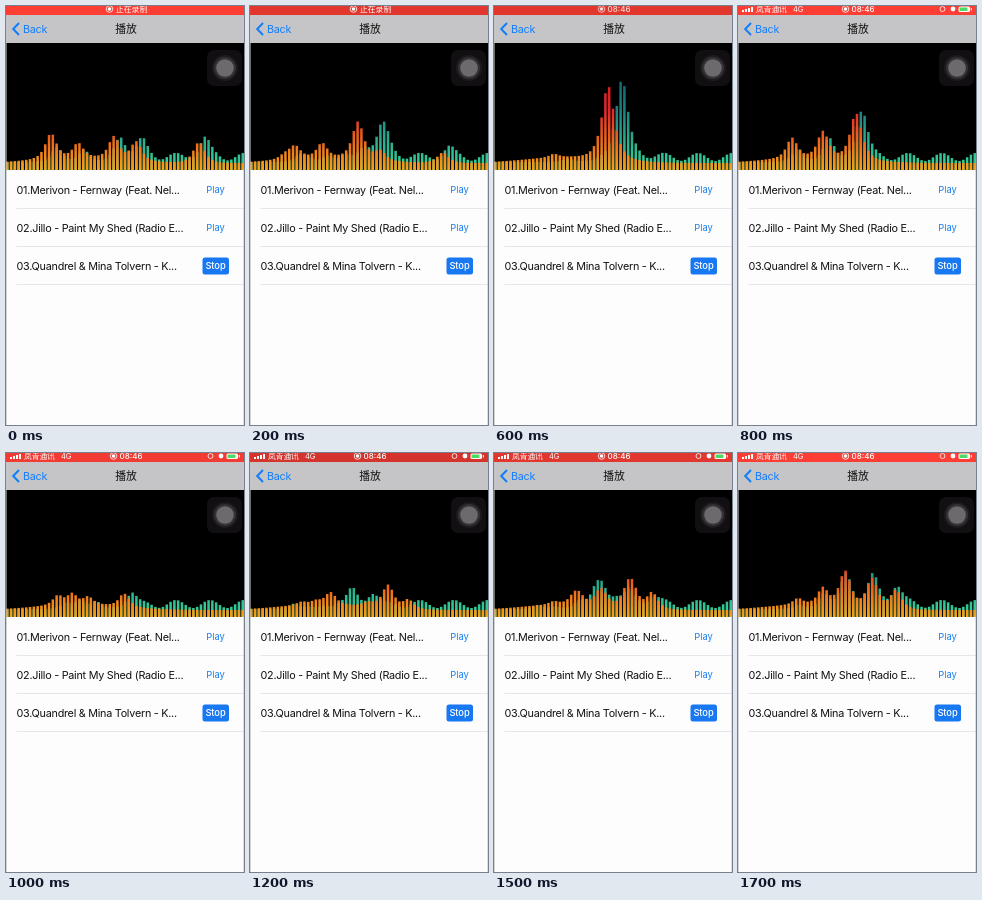
Animation of 238x419 px, one loop 1800 ms. Source, as an HTML page with a canvas:

```html
<!DOCTYPE html>
<html lang="zh">
<head>
<meta charset="utf-8">
<style>
  html, body { margin: 0; width: 100%; height: 100%; overflow: hidden; background: #fff; }
  canvas { display: block; }
</style>
</head>
<body>
<canvas id="stage" width="238" height="419"></canvas>
<script>
const ctx = document.getElementById('stage').getContext('2d');
const LOOP = 1800, STEP = 100;
const BARS = 63, PITCH = 238 / (BARS - 1 / 3), FLOOR = 164;
const BLUE = '#147efb';
const FONTS = 'Inter, "Noto Sans CJK SC", "Noto Sans CJK", sans-serif';

// Main [x, height] peaks of the front channel; the rear channel repeats them, moved by lag.
const poses = [
  { at: 0, lag: 6, peaks: [[45, 35], [72, 24], [108, 32], [130, 27], [193, 27]] },
  { at: 400, lag: 24, peaks: [[35, 16], [72, 24], [108, 62]] },
  { at: 600, lag: 14, peaks: [[60, 10], [114, 84]] },
  { at: 800, lag: 6, peaks: [[54, 30], [85, 37], [118, 56]] },
  { at: 1000, lag: 8, peaks: [[52, 18], [66, 20], [82, 16], [118, 21]] },
  { at: 1300, lag: -36, peaks: [[80, 24], [138, 43], [158, 21]] },
  { at: 1700, lag: 1, peaks: [[60, 14], [85, 27], [107, 45], [134, 38], [158, 26]] }
];

const songs = [
  '01.Merivon - Fernway (Feat. Nel...',
  '02.Jillo - Paint My Shed (Radio E...',
  '03.Quandrel & Mina Tolvern - K...'
];

const clamp = v => Math.max(0, Math.min(1, v));

function gradient(...stops) {
  const g = ctx.createLinearGradient(0, FLOOR, 0, 74);
  stops.forEach((color, i) => g.addColorStop(i / (stops.length - 1), color));
  return g;
}
const rearFill = gradient('#36d69c', '#2bab8c', '#178280', '#106470');
const frontFill = gradient('#f4a31a', '#ec661c', '#e0282a', '#d41c20');

function rect(x, y, w, h, color, radius = 0) {
  ctx.fillStyle = color;
  ctx.beginPath();
  ctx.roundRect(x, y, w, h, radius);
  ctx.fill();
}

function disc(x, y, r, color) {
  ctx.fillStyle = color;
  ctx.beginPath();
  ctx.arc(x, y, r, 0, 7);
  ctx.fill();
}

function ring(x, y, r, color) {
  ctx.strokeStyle = color;
  ctx.lineWidth = 0.8;
  ctx.beginPath();
  ctx.arc(x, y, r, 0, 7);
  ctx.stroke();
}

function text(str, x, y, size, color, { align = 'left', weight = 400, spacing = 0 } = {}) {
  ctx.font = `${weight} ${size}px ${FONTS}`;
  ctx.letterSpacing = spacing + 'px';
  ctx.textAlign = align;
  ctx.fillStyle = color;
  ctx.fillText(str, x, y);
}

function recordIcon(x) {
  ring(x, 3, 3.3, '#fff');
  disc(x, 3, 1.8, '#fff');
}

function statusBar(t) {
  const glow = 0.91 - 0.09 * Math.cos((t - 400) / 900 * 2 * Math.PI);
  rect(0, 0, 238, 9, `rgb(${253 * glow}, ${62 * glow}, ${52 * glow})`);
  ctx.save();
  if (t < 500) {
    recordIcon(103.5);
    text('正在录制', 110, 6, 7.8, '#fff');
  } else {
    ctx.globalAlpha = clamp((t - 400) / 250);
    recordIcon(107.5);
    text('08:46', 113.5, 6, 8, '#fff', { weight: 500 });
    ctx.globalAlpha = clamp((t - 600) / 200);
    for (let i = 0; i < 4; i++) rect(4 + i * 3, 4 - i, 2, 2 + i, '#fff');
    text('岚青通讯', 18, 6, 7.7, '#fff');
    text('4G', 55, 6, 7.5, '#fff');
    ring(204.5, 3, 2.5, '#fff');
    disc(215, 3, 2.4, '#fff');
    rect(220.5, 0.5, 11.5, 5.5, '#fff', 1.5);
    rect(221.5, 1.5, 8, 3.5, '#4cd964', 0.5);
    rect(232.8, 2, 1, 2.5, '#fff');
  }
  ctx.restore();
}

function navigation() {
  rect(0, 9, 238, 28, '#c5c5c7');
  ctx.strokeStyle = BLUE;
  ctx.lineWidth = 2;
  ctx.beginPath();
  ctx.moveTo(13, 17);
  ctx.lineTo(7.2, 23);
  ctx.lineTo(13, 29);
  ctx.stroke();
  text('Back', 17, 27, 10.8, BLUE, { spacing: -0.26 });
  text('播放', 120, 27, 10.8, '#111', { align: 'center', weight: 500 });
}

// Blends the low skirt of the spectrum with rounded peaks.
const blend = (skirt, peaks, x) =>
  Math.hypot(skirt, ...peaks.map(([px, h]) => h / (1 + ((x - px) / 8) ** 2)));

const front = ({ peaks }, x) =>
  blend(7 + 6 * Math.exp(-(((x - 75) / 60) ** 2)), peaks, x);

function rear({ peaks, lag }, x) {
  const ripple = 5 + 4 * Math.cos((x - 170) / 34 * 2 * Math.PI);
  const moved = peaks.map(([px, h]) => {
    const at = px + lag;
    return [at, h * Math.min(1.1, 0.3 + at / 165)];
  });
  return blend(8 + ripple * clamp((x - 100) / 50), moved, x);
}

function spectrum(t) {
  rect(0, 37, 238, FLOOR - 37, '#000');
  const next = Math.max(1, poses.findIndex(p => p.at >= t));
  const a = poses[next - 1], b = poses[next];
  const mix = (t - a.at) / (b.at - a.at);
  for (const [curve, fill] of [[rear, rearFill], [front, frontFill]]) {
    for (let i = 0; i < BARS; i++) {
      const x = i * PITCH, mid = x + PITCH / 3;
      const h = curve(a, mid) * (1 - mix) + curve(b, mid) * mix;
      rect(x, FLOOR - h, PITCH * 2 / 3, h, fill);
    }
  }
}

function floatingButton() {
  rect(201, 44, 35, 36, '#110f12', 7);
  disc(219, 62, 13, '#1d1b1e');
  disc(219, 62, 11, '#343235');
  disc(219, 62, 8.8, '#6c6a6d');
}

function songList() {
  songs.forEach((song, i) => {
    const y = 183.5 + i * 38, playing = i === 2;
    text(song, 10.5, y + 4, 10.8, '#111', { spacing: -0.26 });
    if (playing) rect(196.5, y - 8, 26.5, 17, '#1778f2', 2.5);
    text(playing ? 'Stop' : 'Play', 209.5, y + 3.8, 9.4, playing ? '#fff' : '#1a80f0',
      { align: 'center', weight: playing ? 500 : 400, spacing: -0.1 });
    rect(10.5, y + 18.5, 227.5, 1, '#e6e6e8');
  });
}

function draw(now) {
  const t = Math.floor(now % LOOP / STEP) * STEP;
  rect(0, 0, 238, 419, '#fdfdfd');
  statusBar(t);
  navigation();
  spectrum(t);
  floatingButton();
  songList();
  rect(0, 37, 0.6, 382, '#b8b8b8');
  rect(237.4, FLOOR, 0.6, 255, '#c8c8c8');
}

const start = performance.now();
function tick() {
  draw(performance.now() - start);
  requestAnimationFrame(tick);
}
tick();
</script>
</body>
</html>
```
